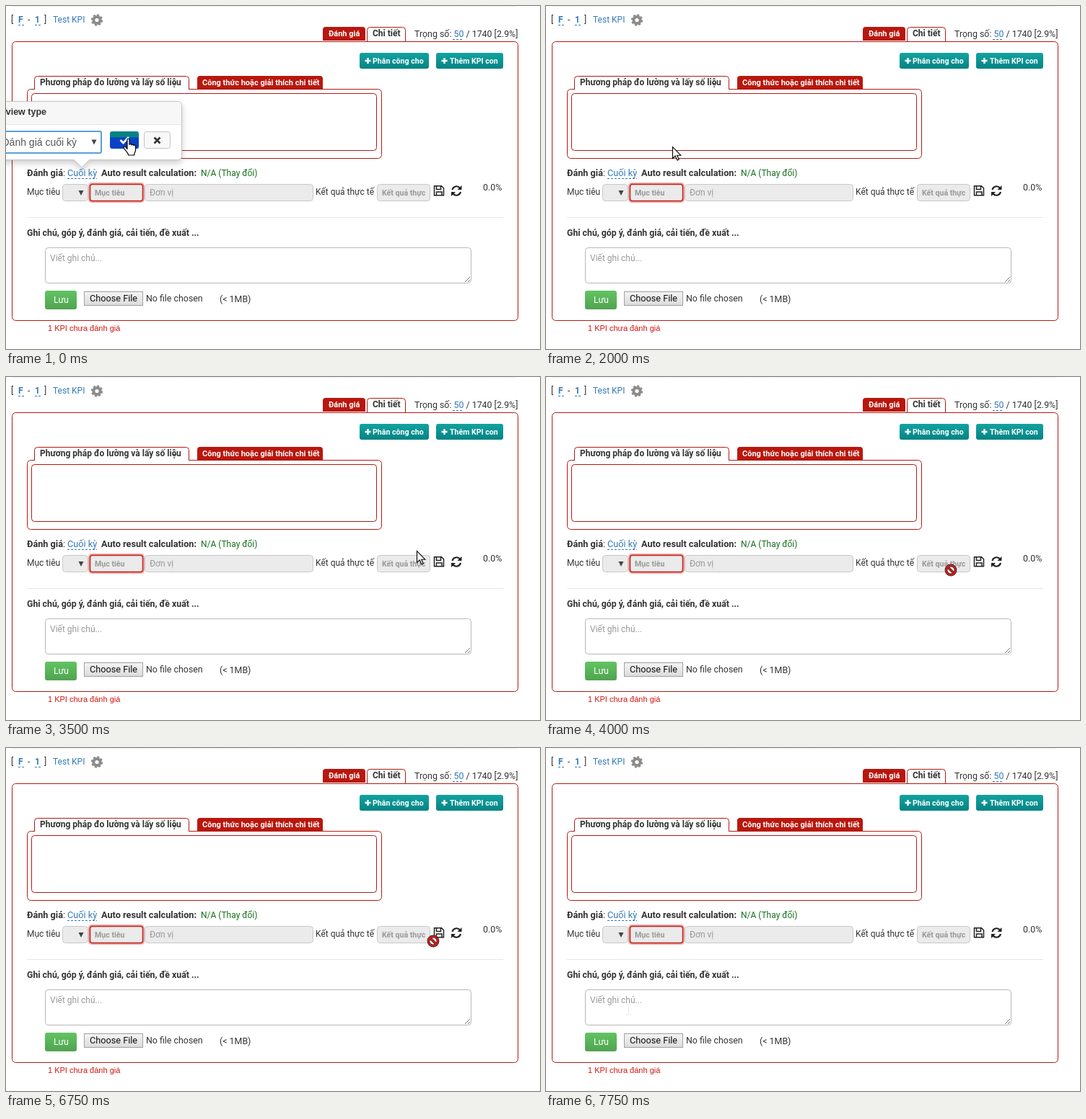
An HTML page that plays this animation: 740 px wide and 476 px high, repeating every 8000 ms.

```html
<!DOCTYPE html>
<html lang="vi">
<head>
<meta charset="utf-8">
<title>KPI review form</title>
<style>
html, body { margin: 0; width: 100%; height: 100%; overflow: hidden; background: #fff; }
svg { display: block; width: 740px; height: 476px; }
text { font: 12px Roboto, "Liberation Sans", sans-serif; fill: #333; white-space: pre; }
.b { font-weight: 700; }
.s12 { font-size: 12.4px; }
.s13 { font-size: 12.7px; }
.s11 { font-size: 11px; }
.btn { font-size: 10.6px; font-weight: 700; }
.arial { font-family: "Liberation Sans", Arial, sans-serif; }
.link { fill: #337ab7; }
.white { fill: #fff; }
.hint { fill: #999; }
.end { text-anchor: end; }
.line { fill: #fff; stroke: #b11a12; }
.red { fill: #b9170d; }
.dash { stroke: #337ab7; stroke-dasharray: 3 2; }
.field { fill: #ebebeb; stroke: #c8c8c8; }
.icon { fill: none; stroke: #222; stroke-width: 1.5; }

#popup, #ok, #hand, .cursor { animation: 8s step-end infinite; }
#popup { animation-name: popup; }
#ok { animation-name: ok; }
#hand { animation-name: hand; }
#arrow { animation-name: arrow; }
#stop { animation-name: stop; }
#beam { animation-name: beam; }

@keyframes popup { 0% { opacity: 1; } 15.625% { opacity: .1; } 18.75%, 100% { opacity: 0; } }
@keyframes ok { 0% { opacity: 1; } 15.625% { opacity: .4; } 18.75%, 100% { opacity: 0; } }
@keyframes hand { 0% { opacity: 1; } 15.625%, 100% { opacity: 0; } }
@keyframes arrow {
  0% { transform: translate(-99px, -99px); }
  25% { transform: translate(175px, 195px); }
  28.125% { transform: translate(-99px, -99px); }
  31.25% { transform: translate(382px, 273px); }
  34.375% { transform: translate(486px, 282px); }
  37.5% { transform: translate(568px, 282px); }
  40.625% { transform: translate(605px, 270px); }
  43.75% { transform: translate(569px, 241px); }
  46.875% { transform: translate(-99px, -99px); }
  90.625% { transform: translate(120px, 293px); }
  93.75%, 100% { transform: translate(-99px, -99px); }
}
@keyframes stop {
  0% { transform: translate(-99px, -99px); }
  46.875% { transform: translate(561px, 260px); }
  50% { transform: translate(561px, 268px); }
  59.375% { transform: translate(592px, 268px); }
  87.5% { transform: translate(384px, 268px); }
  90.625%, 100% { transform: translate(-99px, -99px); }
}
@keyframes beam {
  0% { transform: translate(-99px, -99px); opacity: .5; }
  28.125% { transform: translate(240px, 240px); opacity: .5; }
  31.25% { transform: translate(-99px, -99px); opacity: .5; }
  93.75% { transform: translate(112px, 354px); opacity: .3; }
  96.875%, 100% { transform: translate(114px, 363px); opacity: .12; }
}
</style>
</head>
<body>
<svg viewBox="0 0 740 476">
  <defs>
    <linearGradient id="teal" x2="0" y2="1"><stop stop-color="#12a3a0"/><stop offset="1" stop-color="#058384"/></linearGradient>
    <linearGradient id="green" x2="0" y2="1"><stop stop-color="#62c462"/><stop offset="1" stop-color="#51a351"/></linearGradient>
    <linearGradient id="grey" x2="0" y2="1"><stop stop-color="#f4f4f4"/><stop offset="1" stop-color="#dcdcdc"/></linearGradient>
    <linearGradient id="hover" x2="0" y2="1"><stop offset=".34" stop-color="#058384"/><stop offset=".36" stop-color="#0b41c4"/></linearGradient>
    <filter id="shade" x="-10%" y="-10%" width="120%" height="130%"><feDropShadow dx="0" dy="4" stdDeviation="4" flood-opacity=".2"/></filter>
    <path id="plus" d="M0 4H8M4 0V8" stroke="#fff" stroke-width="2.4"/>
    <path id="drop" d="M-3.5-3H3.5L0 4Z" fill="#444"/>
    <clipPath id="resultClip"><rect x="515" y="248" width="67" height="22"/></clipPath>
  </defs>

  <path d="M9 .5H708" stroke="#e8e8e8" stroke-dasharray="2 1"/>

  <!-- heading -->
  <text x="7" y="23">[</text>
  <text x="17" y="23" class="link b">F</text>
  <text x="30" y="23">-</text>
  <text x="40" y="23" class="link b">1</text>
  <text x="53" y="23">]</text>
  <path class="dash" d="M17 26.5H25M40 26.5H48"/>
  <text x="65" y="23" class="link">Test KPI</text>
  <g fill="none" stroke="#8c8c8c" transform="translate(126 19.5)">
    <circle r="4.6" stroke-width="4"/>
    <circle r="7" stroke-width="2.4" stroke-dasharray="3 2.5"/>
  </g>
  <text x="566" y="43" class="s12">Trọng số: <tspan class="link">50</tspan> / 1740 [2.9%]</text>
  <path class="dash" d="M619 46.5H633"/>

  <!-- panel and its tabs -->
  <rect class="line" x="8.5" y="49.5" width="701" height="387" rx="5"/>
  <path class="red" d="M439 48V33q0-4 4-4H494q4 0 4 4V48Z"/>
  <text x="447" y="42" class="b s11 white">Đánh giá</text>
  <path class="line" d="M500.5 49V33.500q0-4 4-4H549.500q4 0 4 4V49"/>
  <text x="508" y="42" class="b">Chi tiết</text>

  <rect x="490" y="65" width="96" height="22" rx="3" fill="url(#teal)"/>
  <use href="#plus" x="497.500" y="72"/>
  <text x="508" y="80" class="btn white">Phân công cho</text>
  <rect x="596" y="65" width="93" height="22" rx="3" fill="url(#teal)"/>
  <use href="#plus" x="603.500" y="72"/>
  <text x="615" y="80" class="btn white">Thêm KPI con</text>

  <!-- method box -->
  <rect class="line" x="29.500" y="115.500" width="491" height="96" rx="5"/>
  <path class="line" d="M39.500 116V101.500q0-4 4-4H249.500q4 0 4 4V116"/>
  <text x="47" y="110" class="b">Phương pháp đo lường và lấy số liệu</text>
  <path class="red" d="M265 115V101q0-4 4-4H435q4 0 4 4V115Z"/>
  <text x="272" y="110" class="b s11 white">Công thức hoặc giải thích chi tiết</text>
  <rect class="line" x="35.500" y="121.500" width="478" height="79" rx="4"/>

  <!-- result rows -->
  <text x="29" y="236" class="s13"><tspan class="b">Đánh giá</tspan>:</text>
  <text x="85" y="236" class="link s13">Cuối kỳ</text>
  <path class="dash" d="M85 239.500H126"/>
  <text x="132" y="236" class="b s13">Auto result calculation:</text>
  <text x="270" y="236" style="fill:#17701c">N/A (Thay đổi)</text>

  <text x="29" y="262">Mục tiêu</text>
  <rect class="field" x="78.500" y="247.500" width="35" height="23" rx="4"/>
  <use href="#drop" x="104" y="259"/>
  <rect x="115" y="246" width="76" height="26" rx="4" fill="none" stroke="#f0a9a5" stroke-width="2"/>
  <rect x="116.500" y="247.500" width="73" height="23" rx="3" fill="#ebebeb" stroke="#c0201a" stroke-width="1.500"/>
  <text x="123" y="263" class="b hint s11" style="font-size:10.600px">Mục tiêu</text>
  <rect class="field" x="192.500" y="247.500" width="233" height="23" rx="4"/>
  <text x="199" y="263" class="hint">Đơn vị</text>
  <text x="429" y="262">Kết quả thực tế</text>
  <rect class="field" x="514.500" y="247.500" width="73" height="23" rx="4"/>
  <text x="521" y="263" class="b hint s11" style="font-size:10.600px" clip-path="url(#resultClip)">Kết quả thực tế</text>
  <g class="icon">
    <path d="M593.500 249.700H603.500L606.500 252.700V262.700H593.500ZM596.500 250V254.500H602.500V250M596.500 262.500V258H604V262.500"/>
    <path stroke-width="2.200" d="M618.500 255A6 6 0 0 1 629 252.500M630 258A6 6 0 0 1 619.500 260.500"/>
    <path fill="#222" stroke="none" d="M631.500 249V255H625.500ZM617 264V258H623Z"/>
  </g>
  <text x="661" y="256" class="s12">0.0%</text>

  <path d="M29 293.500H689" stroke="#e6e6e6"/>

  <!-- notes -->
  <text x="29" y="319" class="b" style="font-size:12.300px">Ghi chú, góp ý, đánh giá, cải tiến, đề xuất ...</text>
  <rect x="54.500" y="335.500" width="590" height="49" rx="4" fill="#fff" stroke="#b8b8b8"/>
  <path d="M636 383L643 376M640 383L643 380" stroke="#777"/>
  <text x="61" y="354" class="hint">Viết ghi chú...</text>
  <rect x="54" y="395" width="44" height="26" rx="3" fill="url(#green)"/>
  <text x="66" y="412" class="white s12">Lưu</text>
  <rect x="108.500" y="396.500" width="81" height="19" fill="url(#grey)" stroke="#a0a0a0"/>
  <text x="116" y="410" class="s13" style="fill:#111">Choose File</text>
  <text x="194" y="410" class="s12">No file chosen</text>
  <text x="296" y="411" class="s12">(&lt; 1MB)</text>
  <text x="58" y="451" class="arial s11" style="fill:#d5150f">1 KPI chưa đánh giá</text>

  <!-- review popup -->
  <g id="popup">
    <path filter="url(#shade)" fill="#fff" stroke="#c4c4c4" d="M-20 132.500H237.500q6 0 6 6V207.500q0 6-6 6H115.500L105 224L94.500 213.500H-20Z"/>
    <path fill="#f7f7f7" d="M-1 133H237q6 0 6 6V164H-1Z"/>
    <path d="M0 164.500H243" stroke="#e7e7e7"/>
    <text x="56" y="151" class="b arial end" style="font-size:12.500px">view type</text>
    <rect x="-9" y="174" width="141" height="30" rx="2" fill="#fff" stroke="#5a9fd8" stroke-width="2"/>
    <text x="98" y="194" class="arial end" style="font-size:14px;fill:#555">Đánh giá cuối kỳ</text>
    <use href="#drop" x="122" y="188.500"/>
    <rect x="191.500" y="174.500" width="36" height="23" rx="3" fill="#f8f8f8" stroke="#c4c4c4"/>
    <path d="M205.500 182.500L213.500 190.500M213.500 182.500L205.500 190.500" stroke="#333" stroke-width="2.600"/>
  </g>
  <g id="ok">
    <rect x="144" y="174" width="40" height="24" rx="3" fill="url(#hover)"/>
    <path d="M158.500 186L162.500 190L170 182" fill="none" stroke="#fff" stroke-width="2.800"/>
  </g>

  <!-- pointers -->
  <g id="hand">
    <path transform="translate(162.500 184)" fill="#fff" stroke="#000" stroke-width="1.200" stroke-linejoin="round"
      d="M5.500 1.500c0-2 3-2 3 0v7c.3-1.500 3-1.300 3 .4 .5-1.200 2.800-1 2.800.6 .6-1 2.800-.6 2.800 1v5c0 3-2 4-2 7.500h-8c0-3-4.500-6.500-6.500-10 -.8-2 1.500-2.700 2.800-1l2.100 2.300z"/>
  </g>
  <g id="arrow" class="cursor">
    <path d="M.5.500V16.500L4.200 13L7 19L9.300 18L6.700 12.200H11.800Z" fill="#fff" stroke="#000" stroke-width="1.100"/>
  </g>
  <g id="stop" class="cursor" fill="none">
    <circle r="6.500" fill="#fff" stroke="#222" stroke-width="3.800"/>
    <path d="M-4.500-4.500L4.500 4.500" stroke="#222" stroke-width="3.600"/>
    <circle r="6.500" stroke="#d01c1c" stroke-width="2.400"/>
    <path d="M-4.500-4.500L4.500 4.500" stroke="#d01c1c" stroke-width="2.400"/>
  </g>
  <g id="beam" class="cursor">
    <path d="M-3-7.500H-1L.5-6.500L2-7.500H4M.5-6.500V6.500M-3 7.500H-1L.5 6.500L2 7.500H4" fill="none" stroke="#444"/>
  </g>
</svg>
</body>
</html>
```
